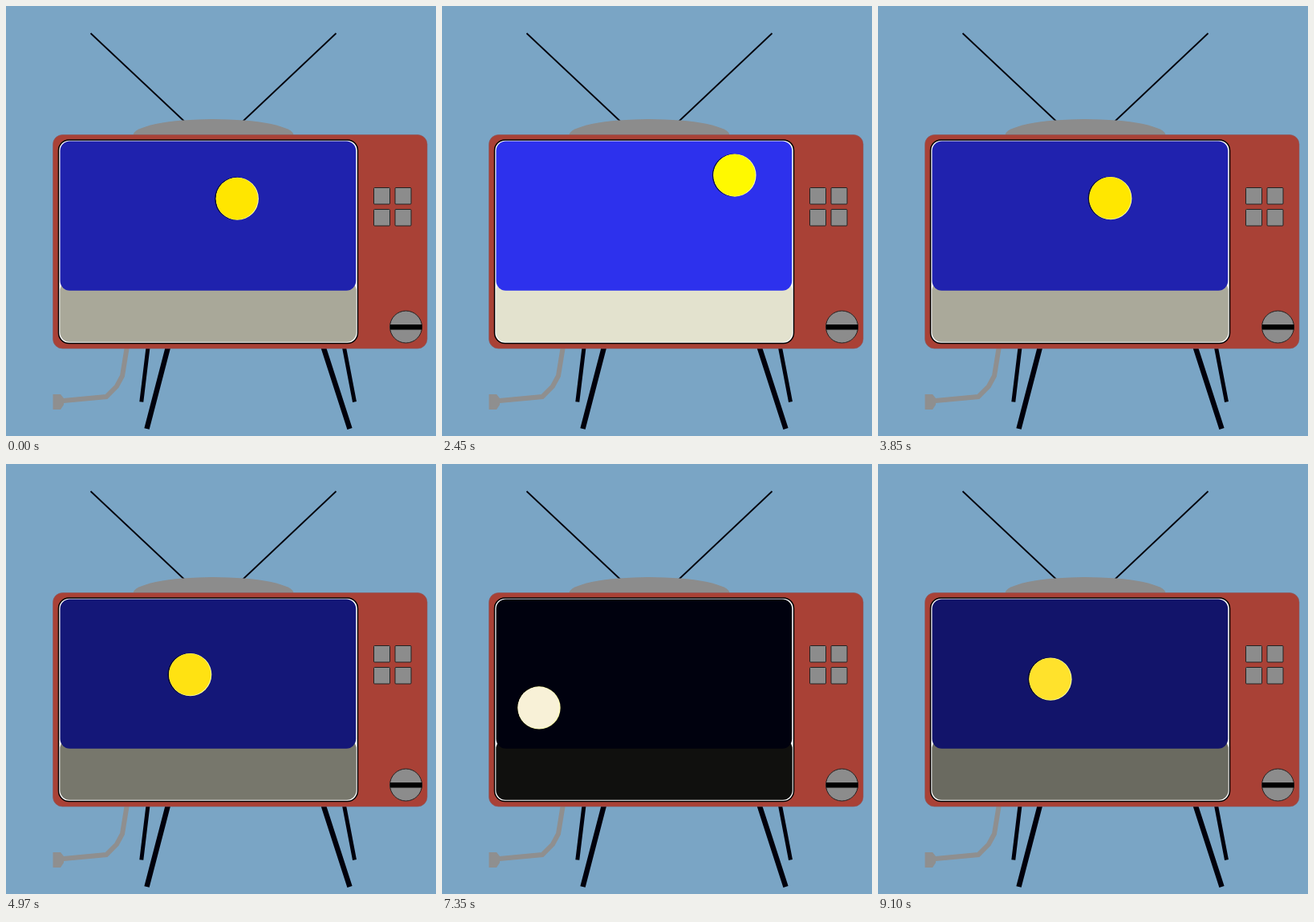
Write an HTML page that moves like this. It is 536x536 px and loops after 9.17 s.

```html
<!DOCTYPE html>
<html lang="en">
<head>
<meta charset="utf-8">
<title>Television</title>
<style>
  html, body { margin: 0; width: 100%; height: 100%; overflow: hidden; background: #7aa5c5; }
  svg { display: block; width: 100vw; height: 100vh; }
  .grey { fill: #8c8c8c; }
  .line { fill: none; stroke: #00000c; }
  .edged { stroke: #222; stroke-width: 1; }
</style>
</head>
<body>
<svg viewBox="0 0 536 536">
  <defs><rect id="button" width="20" height="20.5" rx="1"/></defs>

  <path class="line" stroke-width="1.8" d="M105.5 34L222 143.5M411.5 34L295.5 143.5"/>
  <path class="grey" d="M158.5 161a100 20 0 0 1 200 0z"/>

  <path class="line" stroke-width="5" d="M177.2 424L168.8 493.5M421.2 424L434.5 493.5"/>
  <path class="line" stroke-width="6.5" d="M202.3 424L175.5 527M395.2 424L428.5 527"/>
  <path fill="none" stroke="#8f8f8f" stroke-width="6" d="M151 424L145 461L138 474L125 487L69 492.3"/>
  <path fill="#8f8f8f" d="M58.5 484H68L72 489V497L68 503H58.5z"/>

  <rect x="58.5" y="160.5" width="466.5" height="266.5" rx="12" fill="#a94136" stroke="#8a5a60" stroke-width=".6"/>
  <rect x="65.5" y="167" width="373" height="253.5" rx="13" fill="#fff" stroke="#000" stroke-width="1.5"/>
  <rect id="sand" x="67.3" y="343" width="369.4" height="75.8" rx="12"/>
  <rect id="sky" x="67.5" y="168.5" width="368.7" height="186.3" rx="12"/>
  <g id="sun">
    <circle cx="-.8" cy=".1" r="26.8" opacity=".75"/>
    <circle cx=".5" cy=".2" r="26.6" fill="#ffffa8"/>
    <circle id="disc" r="26.1"/>
  </g>

  <g class="grey edged">
    <use href="#button" x="458.5" y="226.5"/>
    <use href="#button" x="485" y="226.5"/>
    <use href="#button" x="458.5" y="253.5"/>
    <use href="#button" x="485" y="253.5"/>
    <circle cx="498.5" cy="400" r="20"/>
  </g>
  <rect x="479" y="397" width="39.5" height="6.5"/>
</svg>
<script>
const LOOP = 9170, STEP = 70;
const CROSSING = 5233;  // ms from the lowest point to the highest
const NOON = 1939;
const LOW = { x: 111, y: 307.4 }, HIGH = { x: 391.9, y: 200.4 };

const [sun, disc, sky, sand] = ["sun", "disc", "sky", "sand"].map(id => document.getElementById(id));
const mix = (a, b, k) => a + (b - a) * k;

function paint(shape, ...rgb) {
  const clamped = rgb.map(v => Math.round(Math.min(255, Math.max(0, v))));
  shape.setAttribute("fill", `rgb(${clamped})`);
}

function draw(elapsed) {
  const t = Math.floor(elapsed % LOOP / STEP) * STEP;

  // Height of the sun: 1 at noon, 0 at midnight, linear in between
  const h = Math.abs(1 - Math.abs(t - NOON) / CROSSING);
  sun.setAttribute("transform", `translate(${mix(LOW.x, HIGH.x, h)} ${mix(LOW.y, HIGH.y, h)})`);

  paint(disc, 247 + 24 * h, 226 + 100 * (h - 0.42) ** 2, 232 - 509 * h);
  paint(sky, 52 * h - 1.5, 55 * h - 0.5, 4 + 290 * h - 35 * h * h);
  const light = 6 + 290 * h - 50 * h * h;
  paint(sand, light, light * 0.995, light * 0.907);
}

const start = performance.now();
function tick() {
  draw(performance.now() - start);
  requestAnimationFrame(tick);
}
tick();
</script>
</body>
</html>
```
